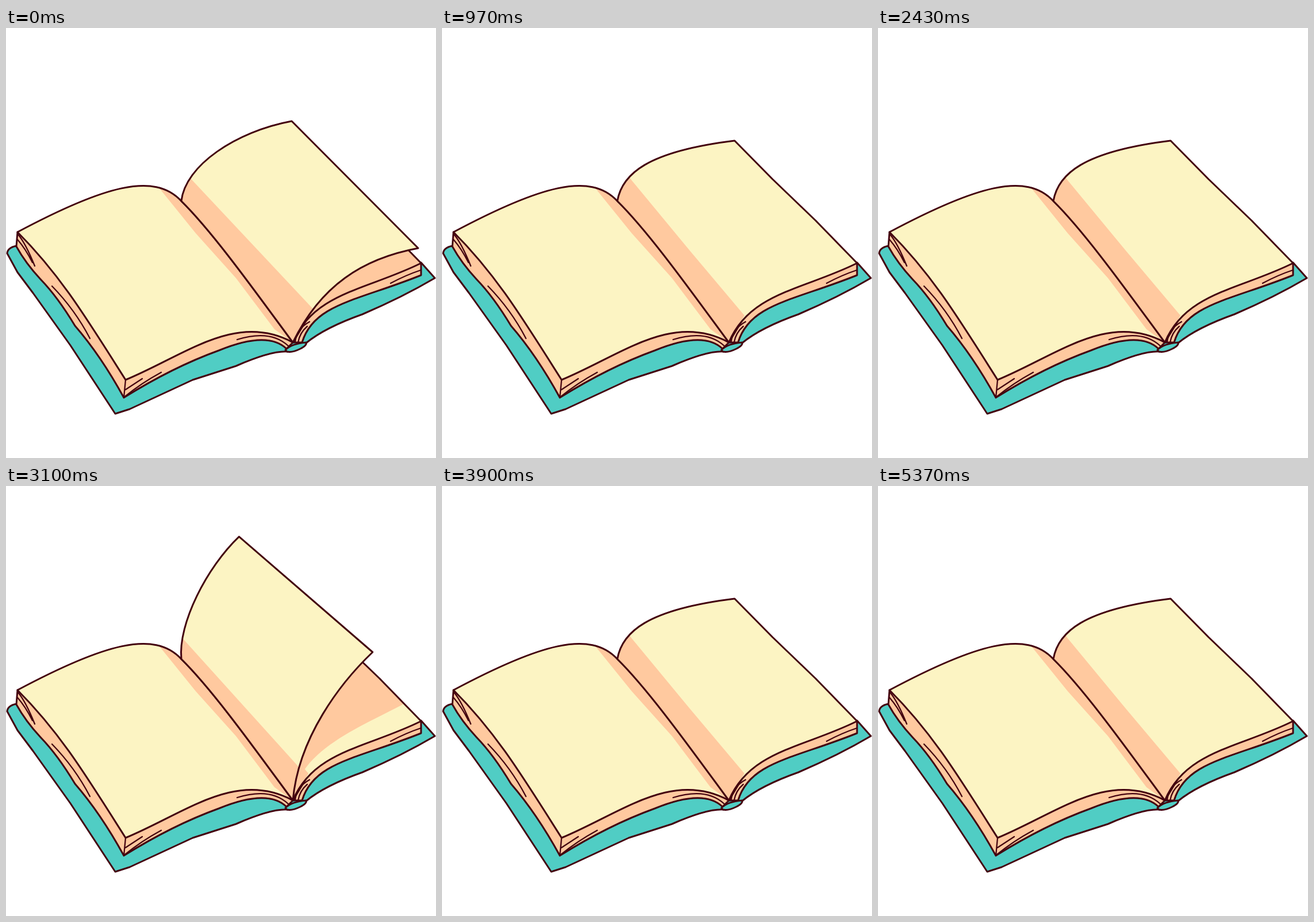
An HTML page with a canvas for the animation above (5.83 s loop, 748 by 748 pixels).

```html
<!DOCTYPE html>
<html lang="en">
<head>
<meta charset="utf-8">
<title>Turning pages</title>
<style>
html, body { margin: 0; width: 100%; height: 100%; overflow: hidden; background: #fff; }
canvas { display: block; }
</style>
</head>
<body>
<canvas id="stage" width="748" height="748"></canvas>
<script>
const ctx = document.getElementById('stage').getContext('2d');
const INK = '#43020f', CREAM = '#fcf4c3', PEACH = '#ffc99f', TEAL = '#50cdc4';
const LOOP = 5830, TURN = LOOP / 4, STEP = 80.5, LAST = 12;
const TOP = [305, 301], FOOT = [499, 547];
const SPINE_UP = 'C435 460 360 355 305 301';

// Pose number -> far corner x, y and near corner x, y of the turning leaf.
const corners = {
  0: [497, 162, 717, 383],
  3: [355, 55, 588, 248],
  4: [280, 42, 484, 239],
  6: [134, 107, 288, 298],
  8: [60, 208, 213, 415],
  12: [20, 355, 208, 612]
};
const keys = Object.keys(corners).map(Number);

// Smooth path through the key corners.
function cornersAt(p) {
  const i = Math.max(0, keys.findLastIndex(k => k <= p && k < LAST));
  const a = keys[i], b = keys[i + 1], span = b - a, u = (p - a) / span;
  const slope = (k, n) => {
    const lo = keys[Math.max(k - 1, 0)], hi = keys[Math.min(k + 1, keys.length - 1)];
    return (corners[hi][n] - corners[lo][n]) / (hi - lo) * span;
  };
  return corners[a].map((v, n) => {
    const d = corners[b][n] - v, s = slope(i, n), e = slope(i + 1, n);
    return v + u * (s + u * (3 * d - 2 * s - e + u * (s + e - 2 * d)));
  });
}

const add = ([x, y], dx, dy) => [x + dx, y + dy];
const polar = (from, degrees, r) =>
  add(from, r * Math.cos(degrees * Math.PI / 180), -r * Math.sin(degrees * Math.PI / 180));

function along(curve, t) {
  const s = 1 - t, w = [s * s * s, 3 * s * s * t, 3 * s * t * t, t * t * t];
  return [0, 1].map(n => curve.reduce((sum, pt, i) => sum + w[i] * pt[n], 0));
}

// Both curved edges swing at the spine and trail behind at the free corners.
function leaf(p, dx = 0, dy = 0) {
  const [fx, fy, nx, ny] = cornersAt(p);
  const far = [fx + dx, fy + dy], near = [nx + dx, ny + dy];
  const swing = (p / LAST) ** 0.8, bow = (p / LAST) ** 4;
  const trail = [20.5 * p - 97, 18 + 22.8 * p - 2.58 * p * p];
  const farEdge = [TOP, polar(TOP, 84 + 48 * swing, 62), add(far, ...trail), far];
  const nearEdge = [FOOT, polar(FOOT, 64 + 88 * swing, 110), add(near, ...trail), near];
  const mid = [(far[0] + near[0]) / 2 + 16 * bow, (far[1] + near[1]) / 2 - 22 * bow];
  const path = new Path2D(`M${TOP} C${farEdge.slice(1)} Q${mid} ${near} C${nearEdge.slice(0, 3).reverse()} ${SPINE_UP} Z`);
  return { path, farEdge, nearEdge };
}

// The strip of a leaf next to the spine, as wide as the given part of its edges.
function strip({ farEdge, nearEdge }, part) {
  const steps = [...Array(21).keys()].map(i => i / 20 * part);
  const rim = steps.map(t => along(farEdge, t)).concat(steps.reverse().map(t => along(nearEdge, t)));
  return new Path2D(`M${rim.join(' L')} ${SPINE_UP} Z`);
}

const cover = new Path2D('M18 379 Q3 382 2 392 L20 425 L47 461 L112 552 L190 671 L215 663 L325 612 L400 588 Q462 561 490 563 L522 548 Q555 521 620 498 Q690 468 746 435 L722 408 L500 480 L200 500 Z');
const nub = new Path2D('M486 560 Q497 549 522 547 Q524 552 512 558 Q498 565 489 563 Z');
const leftBlock = new Path2D('M20 355 L18 380 Q34 409 60 437 Q90 468 120 518 Q165 570 205 643 Q290 590 370 561 Q455 526 488 558 L499 547 L300 400 Z');
const rightBlock = new Path2D('M722 409 L722 430 C610 475 535 480 515 547 L499 547 L600 380 Z');
const leftPage = new Path2D(`M${TOP} C258 250 170 275 20 355 C95 430 140 505 208 612 C310 570 400 493 ${FOOT} ${SPINE_UP} Z`);
const rightPage = new Path2D(`M${TOP} C313 255 355 215 509 196 L575 263 L650 335 L722 409 C630 455 535 460 ${FOOT} ${SPINE_UP} Z`);
const leftGutter = new Path2D(`M${TOP} L290 268 L267 279 L330 357 L400 435 L467 524 L${FOOT} ${SPINE_UP} Z`);
const rightGutter = new Path2D(`M${TOP} L315 245 L330 265 L430 386 L526 500 L${FOOT} ${SPINE_UP} Z`);
const details = new Path2D('M208 612 L205 643 M20 358 Q34 374 50 414 M20 368 Q34 384 46 408 M80 449 Q120 490 146 540'
  + ' M208 629 L237 610 M207 641 Q235 618 270 599 M402 542 Q460 524 491 553'
  + ' M722 421 Q695 430 669 444 M503 546 Q506 523 528 511 M508 547 Q511 530 524 519');

function paint(path, fill) {
  ctx.fillStyle = fill;
  ctx.fill(path);
  ctx.stroke(path);
}

function page(path, ...shades) {
  ctx.fillStyle = CREAM;
  ctx.fill(path);
  ctx.save();
  ctx.clip(path);
  ctx.fillStyle = PEACH;
  shades.forEach(shade => ctx.fill(shade));
  ctx.restore();
  ctx.stroke(path);
}

function draw(p) {
  const turning = p < LAST;
  const cast = turning ? [leaf(p, 100, 45 + 7 * p).path] : [];
  ctx.fillStyle = '#fff';
  ctx.fillRect(0, 0, 748, 748);
  ctx.strokeStyle = INK;
  ctx.lineJoin = ctx.lineCap = 'round';
  ctx.lineWidth = 3;
  paint(cover, TEAL);
  paint(leftBlock, PEACH);
  paint(rightBlock, PEACH);
  paint(nub, TEAL);
  page(leftPage, leftGutter, ...cast);
  page(rightPage, rightGutter, ...cast);
  ctx.lineWidth = 2.3;
  ctx.stroke(details);
  if (!turning) return;
  // The front shade narrows as the leaf rises, the back starts fully shaded.
  const part = p < 6 ? 0.22 - 0.02 * p : 0.2 + 0.8 * ((LAST - p) / 6) ** 4;
  const sheet = leaf(p);
  ctx.lineWidth = 3;
  page(sheet.path, strip(sheet, part));
}

const start = performance.now();
function tick(now) {
  const t = Math.max(0, now - start) % LOOP;
  // Poses change on a 30 per second clock.
  const clock = Math.floor((t + 4) * 0.03) / 0.03;
  draw(Math.min(LAST, Math.floor(clock % TURN / STEP)));
  requestAnimationFrame(tick);
}
tick(start);
</script>
</body>
</html>
```
